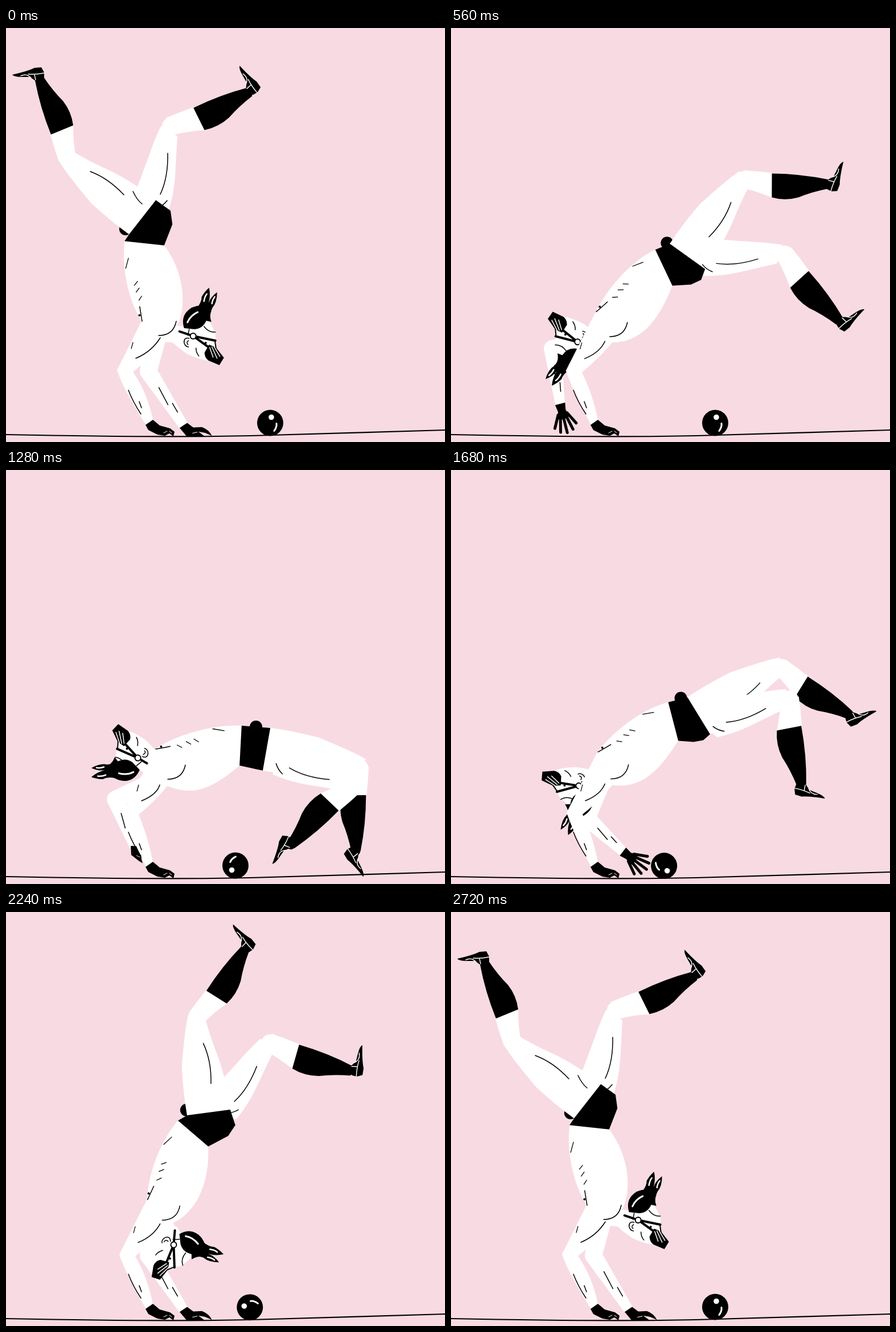
Write an HTML page with a canvas that moves like this. It is 771x727 px and loops after 2800 ms.

```html
<!DOCTYPE html>
<html lang="en">
<head>
<meta charset="utf-8">
<title>Acrobat and ball</title>
<style>
html, body { margin: 0; width: 100%; height: 100%; overflow: hidden; background: #f8dbe2; }
canvas { display: block; }
</style>
</head>
<body>
<canvas id="stage" width="771" height="727"></canvas>
<script>
const c = document.getElementById('stage').getContext('2d');
const PINK = '#f8dbe2', INK = '#000', SKIN = '#fff';
const LOOP = 2800, HOLD = 320, STEP = 80, STEPS = 31;
const DEG = Math.PI / 180;

const clamp = x => Math.max(0, Math.min(1, x));
const smooth = x => (x = clamp(x), x * x * (3 - 2 * x));
const mix = (a, b, t) => a + (b - a) * t;
const mixPt = (a, b, t) => [mix(a[0], b[0], t), mix(a[1], b[1], t)];
const at = (p, deg, r) => [p[0] + r * Math.cos(deg * DEG), p[1] + r * Math.sin(deg * DEG)];
const shift = (p, x, y) => [p[0] + x, p[1] + y];
const angle = (a, b) => Math.atan2(b[1] - a[1], b[0] - a[0]) / DEG;
const dist = (a, b) => Math.hypot(b[0] - a[0], b[1] - a[1]);
const quad = (a, b, d, t) => mixPt(mixPt(a, b, t), mixPt(b, d, t), t);

// 0 = handstand, 1 = bridge: falls fast, rests, then rises back
function swing(k, fall = 8.5, rise = 1.25) {
  if (k < 13) return Math.sin(clamp(k / fall) * Math.PI / 2);
  return 1 - ((k - 13) / (STEPS - 13)) ** rise;
}

const curve = (a, b, d, u) => a + b * u + d * u * u;

// Joints from hip to toe, each bone as [angle, length]
const chain = (hip, bones) => bones.reduce((l, [a, r]) => [...l, at(l[l.length - 1], a, r)], [hip]);

function pose(k) {
  const u = swing(k), w = mix(-84, 3, u);
  const W = quad([243, 378], [366, 366], [412, 484], u);
  const hipA = at(W, mix(-94, 8, u), 46), hipB = at(hipA, w + 46, 28);
  const toes = 7 * (k - 11) * u ** 8;

  const shinA = curve(-110, 95, 107, u);
  const shinB = curve(-24, 110, 50, swing(k, 11, 1));
  const legA = chain(hipA, [[curve(-142, 85, 67, u), 165], [shinA, 148], [shinA - 61 + 28 * u ** 4 + toes, 47]]);
  const legB = chain(hipB, [
    [curve(-80, 52, 44, swing(k, 6.4, 1)), 142], [shinB, 153], [shinB - 87 + 70 * u ** 4 + toes, 47]
  ]);
  return { k, u, w, W, legs: [legA, legB] };
}
const rest = pose(0);

const fill = (d, color = INK) => { c.fillStyle = color; c.fill(new Path2D(d)); };
const line = (d, color = INK, width = 1.5) => {
  c.strokeStyle = color; c.lineWidth = width; c.stroke(new Path2D(d));
};
const poly = (pts, color = INK) => fill('M' + pts.map(p => p.join(' ')).join('L') + 'Z', color);
const seg = (a, b, color, width) => line(`M${a}L${b}`, color, width);
const disc = (p, r, color = INK) => {
  c.fillStyle = color; c.beginPath(); c.arc(p[0], p[1], r, 0, 7); c.fill();
};

function taper(a, b, ra, rb, color) {
  const n = angle(a, b) + 90;
  poly([at(a, n, ra), at(b, n, rb), at(b, n, -rb), at(a, n, -ra)], color);
  disc(a, ra, color);
}

// Draws around a pivot that lands on p, turned and scaled
function turned(p, deg, pivot, draw, size = 1) {
  c.save();
  c.translate(...p);
  c.rotate(deg * DEG);
  c.scale(size, size);
  c.translate(-pivot[0], -pivot[1]);
  draw();
  c.restore();
}

// Moves a shape made for bone a0-b0 onto bone a-b
const onto = (a0, b0, a, b, draw) =>
  turned(a, angle(a, b) - angle(a0, b0), a0, draw, dist(a, b) / dist(a0, b0));

const thighs = [
  () => {
    fill('M94 235Q108 258 150 308Q185 340 217 363L263 302L232 279Q200 258 175 247Q150 236 121 219Z', SKIN);
    line('M148 252Q180 264 207 293M223 287Q230 302 239 309');
  },
  () => {
    fill('M272 172Q260 198 252 222L230 281L246 312L262 328L286 319Q295 290 297 260L301 190Z', SKIN);
    line('M284 220Q285 262 271 292M266 316Q276 312 283 303');
  }
];

function shin() {
  disc([107.5, 227.5], 15, SKIN);
  fill('M93 235Q85 212 78 187L118 170Q118 200 122 222Z', SKIN);
  fill('M79 187L118 171Q115 147 100 128Q82 110 66 86L51 92Q60 140 79 187Z');
  disc([58, 89], 7);
}

function foot() {
  fill('M52 93L67 87L67 78L62 69L50 70Q38 76 11 82Q14 86 28 86L42 86Z');
  line('M26 84Q37 79 44 88M39 81Q52 82 67 79M50 82L52 91', SKIN, 1.4);
}

function leg(i, p) {
  const [h, k, a, t] = p.legs[i], r = rest.legs[i], base = rest.legs[0];
  onto(r[0], r[1], h, k, thighs[i]);
  onto(base[1], base[2], k, a, shin);
  onto(base[2], base[3], a, t, foot);
}

function openHand() {
  poly([[0, 9], [0, -9], [12, -7], [25, -10], [28, 0], [26, 9], [12, 7]]);
  for (let i = -2; i <= 2; i++) {
    seg([18, i * 4], at([0, 0], i * 13, 52 - i * i * 2), INK, 5);
  }
}

function flatHand() {
  fill('M305 702L318 693L329 701L344 700Q356 704 362 715L350 710L338 708L349 716L340 717L318 717Z');
  line('M328 711L336 709', SKIN, 1);
}

// The far arm lets go, swings out and reaches back under the body
function farArm(k) {
  const out = smooth(k / 3.5) * smooth((19 - k) / 9);
  const reach = k > 10 && k < 23 ? Math.sin((k - 10) / 13 * Math.PI) ** 2 : 0;
  const elbow = shift(mixPt([250, 603], [178, 563], out), -10 * reach, 11 * reach);
  const turn = 57 + 25 * out - 17 * reach;
  const wrist = at(elbow, turn, 113 - 15 * out - 30 * reach);
  taper([262, 548], elbow, 18, 15, SKIN);
  taper(elbow, wrist, 15, 8.5, SKIN);

  const along = (t, off) => at(mixPt(elbow, wrist, t), turn + 90, off);
  seg(along(.3, 0), along(.6, 3));
  seg(along(.62, -5), along(.78, -4));

  const planted = k < 2 || k > 21, open = k < 7 || k > 15;
  if (open && !planted) turned(wrist, turn - 6, [0, 0], openHand);
  else turned(wrist, turn - (planted ? 56 : 30), [311.5, 697.5], flatHand, planted ? 1 : .8);
}

function head(k, u) {
  const neck = [272, 535], pin = [329, 541];
  const b = at(neck, curve(6, 110, 100, swing(k, 6.6)), mix(57, 50, u));
  seg(neck, b, SKIN, 30);
  turned(b, 192 * swing(k, 5), pin, () => {
    fill('M300 528L288 547Q300 560 318 572Q335 581 354 584L368 562L368 535L358 516L340 514Z', SKIN);
    line('M348 524Q356 535 368 534');
    turned(pin, 28 * u ** 4, pin, () => {
      fill('M313 527Q308 510 317 499Q326 488 343 487L361 497Q357 505 361 516L352 514Q346 528 331 529Z');
      line('M319 517Q324 505 337 499', SKIN, 3);
      line('M322 529L320 540');
      const root = [346, 494];
      turned(root, 22 * Math.sin(k / STEPS * Math.PI), root, () => {
        fill('M335 492Q344 482 344 472Q349 463 357 456Q360 470 356 483'
          + 'Q360 472 371 464Q371 482 363 491L358 503Z');
        line('M348 480Q349 472 353 467M362 484Q363 477 367 472', SKIN, 2.5);
      });
    });
    fill('M349 570L357 556L369 561L383 579L375 592L356 584Q349 579 349 570Z');
    line('M305 533L329 541L368 549M329 541L358 562', INK, 4);
    line('M367 548L369 562', INK, 2);
    line('M358 561L364 578M362 560L371 580M366 560L376 577', SKIN, 1.5);
    disc([351, 553], 2);
    line('M322 545Q313 543 313 552Q315 560 321 560M321 549Q316 552 320 556');
    line('M334 562Q334 570 339 576');
    disc(pin, 6);
    disc(pin, 4, SKIN);
  });
}

function trunk({ w, u }, L, R) {
  const P = mixPt([238, 515], [262, 490], u), Q = mixPt([284, 546], [283, 555], u);
  const E = mixPt([210, 601], [220, 602], u);
  const c1 = at(L, w + 180, 50), c2 = at(P, w - 37, 45);
  fill(`M${L}C${c1} ${c2} ${P}L${shift(E, -15, 0)}Q${shift(E, 0, 42)} 246 697L258 688`
    + `Q248 640 ${shift(E, 13, 3)}Q${shift(E, 42, -20)} ${Q}`
    + `C${at(Q, w * .7 + 18, 48)} ${at(R, w + 137, 70)} ${R}Z`, SKIN);

  // Small marks that follow the chest side
  const side = (t, d) => {
    const a = quad(L, c1, c2, t), b = quad(c1, c2, P, t);
    return at(mixPt(a, b, t), angle(a, b) - 90, d);
  };
  for (const t of [.5, .59, .7]) seg(side(t, 19), side(t + .04, 12), INK, 1.3);
  seg(side(.2, 8), side(.32, 2), INK, 1.3);
  line(`M${shift(P, 1, 0)}Q${side(.92, 5)} ${side(.82, 9)}`);
  disc(side(.92, 2), 2);

  const x = u * 16, y = u * 3;
  line(`M${268 + x} ${540 + y}Q${294 + x} ${540 + y} ${299 + x} ${515 + y}`);
  line(`M${shift(Q, -13, -2)}Q${shift(E, 45, -32)} ${shift(E, 18, -21)}`);
  line(`M${shift(E, 10, -38)}L${shift(E, 13, -49)}`, INK, 1.2);
  line('M215 636Q223 657 237 678M234 656L238 667');
  fill('M245 697L258 688L270 698L288 703L296 709L294 717L287 712L279 716L266 714L250 706Z');
  line('M277 711L283 708M287 708L291 711', SKIN, 1);
}

// Rolls left and back without slipping
function ball(k) {
  const s = clamp((k - 7) / (STEPS - 7)) ** .85;
  const dx = -45 * (1 - Math.cos(s * 2 * Math.PI));
  turned([464 + dx, 693.5 - dx * .018], dx / 23 / DEG, [0, 0], () => {
    disc([0, 0], 23);
    disc([2, -10], 4.8, SKIN);
    line('M11 1Q12 7 7 14', SKIN, 3);
  });
}

function draw(k) {
  const p = pose(k), { u, w, W } = p, [hip, knee] = p.legs[0];
  const thigh = angle(hip, knee);
  const L = at(W, w - 90, 35), R = at(W, w + 90, 35);
  const cutL = at(hip, thigh - 90, 38), cutR = at(hip, thigh + 90, 38);
  const fold = 22 * clamp((w - thigh) / 44);

  c.fillStyle = PINK;
  c.fillRect(0, 0, 771, 727);
  c.lineCap = c.lineJoin = 'round';
  line('M0 714C150 717 300 719 430 716S650 709 771 706', INK, 2.2);
  ball(k);
  farArm(k);
  head(k, u);
  disc(at(mixPt(L, cutL, .5), w - 15, fold * .7), 11);
  leg(0, p);
  leg(1, p);
  trunk(p, L, R);
  poly([L, R, at(mixPt(R, cutR, .4), w + 70, fold * .95), at(mixPt(R, cutR, .7), w + 70, fold), cutR, cutL]);
}

let shown = -1;
function tick() {
  const t = performance.now() % LOOP;
  const k = t < HOLD ? 0 : Math.floor((t - HOLD) / STEP) + 1;
  if (k !== shown) draw(shown = k);
  requestAnimationFrame(tick);
}
tick();
</script>
</body>
</html>
```
